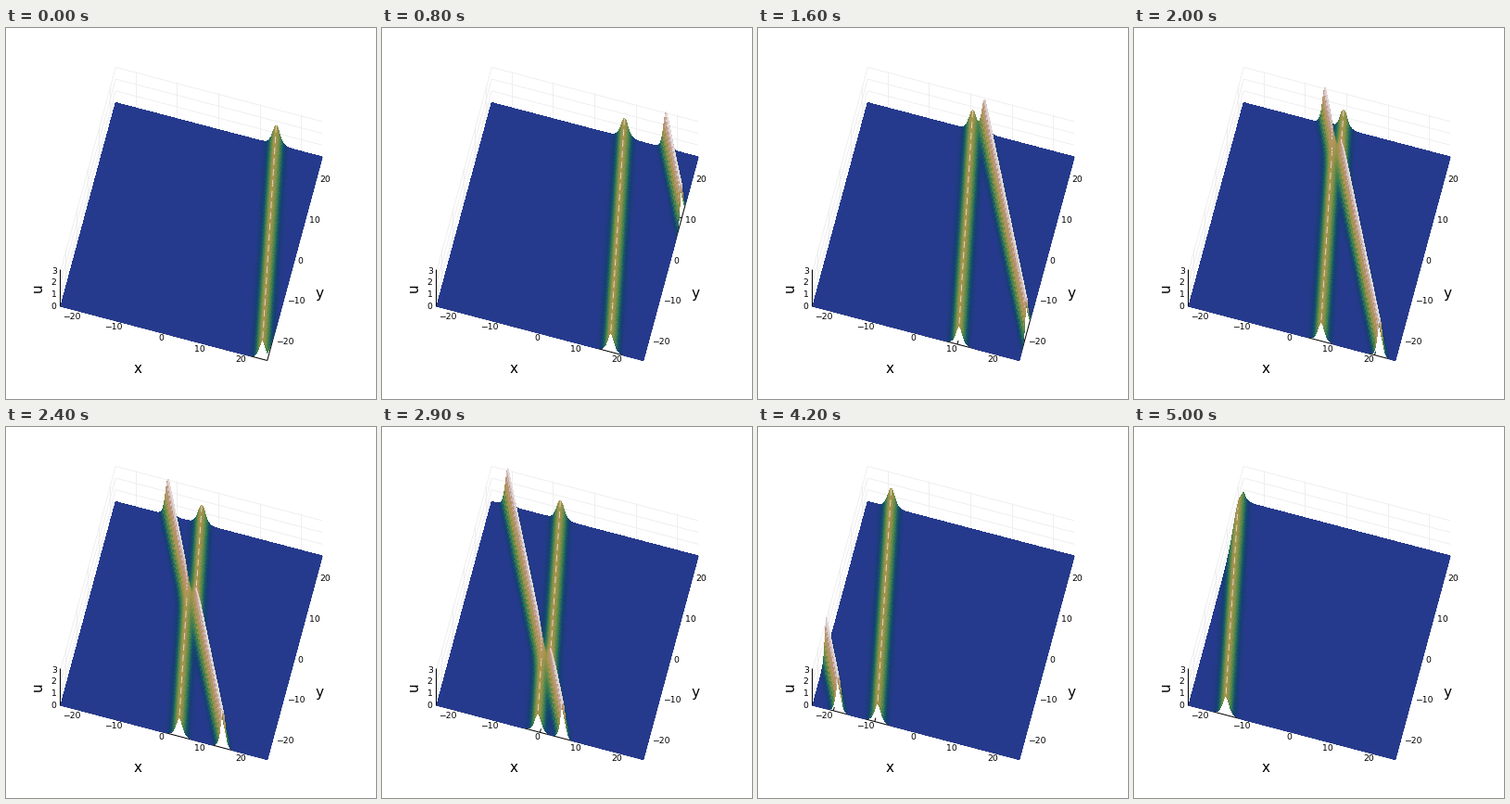
Write a matplotlib script that moves like this. It is 399x400 px and loops after 5.05 s.

```python
import numpy as np
import matplotlib.pyplot as plt
from matplotlib.animation import FuncAnimation
from matplotlib.collections import LineCollection, PolyCollection
from matplotlib.colors import LinearSegmentedColormap

W, H, DPI = 399, 400, 100
FRAMES, STEP_MS = 101, 50
PX = 72 / DPI  # one pixel in points
R = 25         # half range of x and y
Z_TOP = 3.12
U_MAX = 3.125
NUDGE = 0.14   # puts upright lines on whole pixels

plt.rcParams["font.family"] = "DejaVu Sans"

terrain = LinearSegmentedColormap.from_list("dark_terrain", [
    (0.00, (0.149, 0.227, 0.553)),
    (0.03, (0.090, 0.240, 0.455)),
    (0.08, (0.090, 0.320, 0.415)),
    (0.18, (0.200, 0.480, 0.320)),
    (0.35, (0.440, 0.550, 0.280)),
    (0.50, (0.640, 0.580, 0.300)),
    (0.62, (0.700, 0.580, 0.360)),
    (0.75, (0.720, 0.580, 0.470)),
    (0.88, (0.780, 0.680, 0.680)),
    (1.00, (0.950, 0.940, 0.950)),
], N=512)


def project(x, y, z=0.0):
    """Orthographic view: data coordinates to stage pixels."""
    px = 59 + 4.455 * (x + R) + 1.185 * (y + R)
    py = 300 + 1.17 * (x + R) - 4.39 * (y + R) - 12.7 * z
    return np.stack(np.broadcast_arrays(px, py), axis=-1)


# KP two-soliton solution: each soliton is a pair (p, q)
SMALL, TALL = (1.0, -0.8), (1.5, -1.0)


def wave(soliton):
    p, q = soliton
    return p - q, p**2 - q**2, 4 * (p**3 - q**3)


def coupling(a, b):
    (p1, q1), (p2, q2) = a, b
    return (p1 - p2) * (q1 - q2) / ((p1 - q2) * (q1 - p2))


LOG_A = np.log(coupling(SMALL, TALL))


def height(x, y, t):
    """u = 2 (log tau)_xx, tau = 1 + e^a + e^b + A e^(a+b)."""
    (k1, l1, w1), (k2, l2, w2) = wave(SMALL), wave(TALL)
    a = -(k1 * x + l1 * y + w1 * t)
    b = -(k2 * x + l2 * y + w2 * t)
    expo = np.stack([0 * a, a, b, a + b + LOG_A])
    weight = np.exp(expo - expo.max(axis=0))
    weight /= weight.sum(axis=0)
    k = np.array([0, k1, k2, k1 + k2])[:, None, None]
    mean = (weight * k).sum(axis=0)
    return 2 * ((weight * k**2).sum(axis=0) - mean**2)


xs = np.linspace(-R, R, 200)
ys = np.linspace(R, -R, 100)  # far rows first
X, Y = np.meshgrid(xs, ys)
DX, DY = xs[1] - xs[0], ys[0] - ys[1]


def corners(a):
    return a[:-1, :-1], a[:-1, 1:], a[1:, 1:], a[1:, :-1]


def flat_runs(flat):
    """One strip per run of flat cells in each row."""
    edge = np.zeros((len(flat), 1), int)
    change = np.diff(np.hstack([edge, flat.astype(int), edge]), axis=1)
    row, start = np.nonzero(change == 1)
    end = np.nonzero(change == -1)[1]
    return np.stack([project(xs[start], ys[row]), project(xs[end], ys[row]),
                     project(xs[end], ys[row + 1]),
                     project(xs[start], ys[row + 1])], axis=1)


def crest_lines(u):
    """Short strokes on the ridge tops: dashed if low, solid if high."""
    left, mid, right = u[:-1, :-2], u[:-1, 1:-1], u[:-1, 2:]
    row, col = np.nonzero((mid > left) & (mid >= right) & (mid > 1.4))
    l, m, r = (a[row, col] for a in (left, mid, right))
    high = m > 2.3
    keep = high | (row % 5 < 3)
    x = xs[col + 1] + 0.5 * DX * (l - r) / (l - 2 * m + r)
    y = ys[row]
    lean = np.where(high, sum(TALL), sum(SMALL)) * DY
    strokes = np.stack([project(x, y, m), project(x + lean, y - DY, m)],
                       axis=1)
    return strokes[keep]


fig = plt.figure(figsize=(W / DPI, H / DPI), dpi=DPI, facecolor="white")
ax = fig.add_axes([0, 0, 1, 1])
ax.set_xlim(0, W)
ax.set_ylim(H, 0)
ax.axis("off")

ticks = range(-20, 21, 10)


def segment(a, b):
    return [project(*a), project(*b)]


grid = []
for v in ticks:
    grid.append(segment((v - NUDGE, R, 0), (v - NUDGE, R, Z_TOP)))
    grid.append(segment((-R - NUDGE, v, 0), (-R - NUDGE, v, Z_TOP)))
for z in range(4):
    grid.append(segment((-R, R, z), (R, R, z)))
    grid.append(segment((-R, -R, z), (-R, R, z)))
ax.add_collection(LineCollection(grid, colors="#ececec",
                                 linewidths=0.8 * PX, zorder=0))

axes = [segment((-R, -R, 0), (R, -R, 0)),
        segment((R, -R, 0), (R, R, 0)),
        segment((-R - NUDGE, -R, 0), (-R - NUDGE, -R, Z_TOP))]
for v in ticks:
    axes.append(segment((v, -R, 0), (v, -R + 0.9, 0)))
    axes.append(segment((R, v, 0), (R - 0.9, v, 0)))
ax.add_collection(LineCollection(axes, colors="black",
                                 linewidths=PX, zorder=1))


def label(x, y, s, size=9.3, ha="center", **kw):
    ax.text(x, y, s, fontsize=size * PX, ha=ha, va="center", **kw)


for v in ticks:
    s = str(v).replace("-", "\u2212")
    x, y = project(v, -R)
    label(x - 0.4, y + 5.2, s, ha="right")
    x, y = project(R, v)
    label(x + 3.3, y + 2.3, s, ha="left")
for z in range(4):
    x, y = project(-R, -R, z)
    label(x - 4.3, y + 0.3, str(z), ha="right")
label(142, 367, "x", 15.3)
label(338, 287, "y", 15.3)
label(34, 280, "u", 15.3, rotation=90)

crisp = dict(edgecolors="none", antialiaseds=False)
floor = PolyCollection([], facecolors=[terrain(0.0)], zorder=2, **crisp)
ridges = PolyCollection([], zorder=3, **crisp)
crests = LineCollection([], colors=[(0.9, 0.87, 0.84)],
                        linewidths=0.9 * PX, zorder=4)
for part in (floor, ridges, crests):
    ax.add_collection(part, autolim=False)


def draw(n):
    u = height(X, Y, -6.25 + 0.125 * n)
    cells = np.stack(corners(u), axis=-1)
    top = cells.max(axis=-1)
    raised = top > 0.002
    quads = np.stack(corners(project(X, Y, u)), axis=2)
    floor.set_verts(flat_runs(top < 0.006))
    ridges.set_verts(quads[raised])
    ridges.set_facecolor(terrain(cells[raised].mean(axis=-1) / U_MAX))
    crests.set_segments(crest_lines(u))
    return floor, ridges, crests


anim = FuncAnimation(fig, draw, frames=FRAMES, interval=STEP_MS,
                     repeat=True, repeat_delay=0, blit=False)
plt.show()
```
